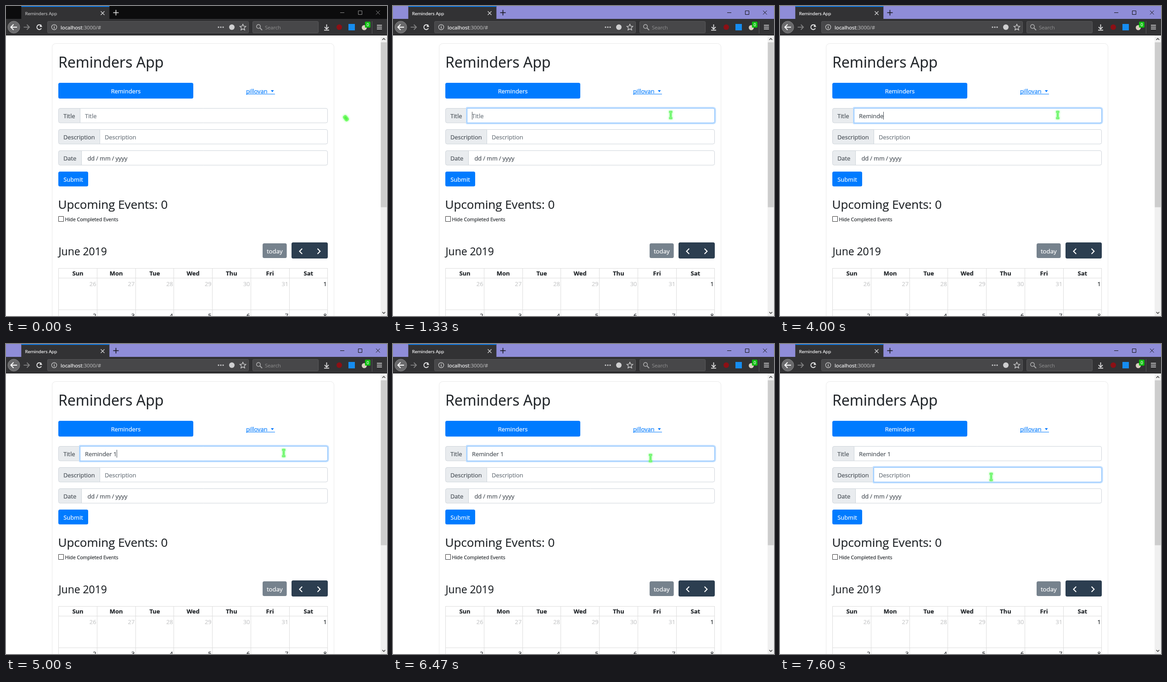
Animation, 830 px wide and 674 px high, one loop 8000 ms. Source, as an HTML page with a canvas:

```html
<!DOCTYPE html>
<html lang="en">
<head>
<meta charset="utf-8">
<title>Reminders App</title>
<style>
html, body { margin: 0; width: 100%; height: 100%; overflow: hidden; background: #fff; }
canvas { display: block; width: 830px; height: 674px; }
</style>
</head>
<body>
<canvas id="stage" width="830" height="674"></canvas>
<script>
const ctx = document.getElementById('stage').getContext('2d');
const LOOP = 8000, TICK = 200 / 3, BLINK = 8;
const FOCUS = 20, CLICK = 105, BODY = 12.85;
const INK = '#212529', BLUE = '#007bff', GRAY = '#495057', HINT = '#6c757d', EDGE = '#ced4da';
const LIGHT = '#e3e3e4', SOFT = '#cfcfd0';

// Typed characters and the ticks they appear at
const TYPED = 'Reminder 1';
const KEYS = [40, 42, 45, 48, 51, 57, 60, 61, 69, 75];

function text(str, x, y, size, color, align = 'left', weight = 'normal') {
  ctx.font = `${weight} ${size}px "Open Sans", sans-serif`;
  ctx.textAlign = align;
  ctx.fillStyle = ctx.strokeStyle = color;
  ctx.lineWidth = 0.22;
  ctx.fillText(str, x, y);
  ctx.strokeText(str, x, y);
  return ctx.measureText(str).width;
}

function rect(x, y, w, h, color) {
  ctx.fillStyle = color;
  ctx.fillRect(x, y, w, h);
}

function paint(fill, stroke, width = 1) {
  if (fill) { ctx.fillStyle = fill; ctx.fill(); }
  if (stroke) { ctx.strokeStyle = stroke; ctx.lineWidth = width; ctx.stroke(); }
}

function box(x, y, w, h, r, fill, stroke) {
  ctx.beginPath();
  ctx.roundRect(x, y, w, h, r);
  paint(fill, stroke);
}

function disc(x, y, r, fill, stroke, width) {
  ctx.beginPath();
  ctx.arc(x, y, r, 0, Math.PI * 2);
  paint(fill, stroke, width);
}

function line(x0, y0, x1, y1, color, width = 1) {
  ctx.beginPath();
  ctx.moveTo(x0, y0);
  ctx.lineTo(x1, y1);
  paint(null, color, width);
}

function cross(x, y, r, color, width) {
  line(x - r, y - r, x + r, y + r, color, width);
  line(x - r, y + r, x + r, y - r, color, width);
}

// Open arrow head with its tip at x, y; turn counts quarter turns from "right"
function chevron(x, y, r, turn, color, width) {
  ctx.save();
  ctx.translate(x, y);
  ctx.rotate(turn * Math.PI / 2);
  ctx.beginPath();
  ctx.moveTo(-r, -r);
  ctx.lineTo(0, 0);
  ctx.lineTo(-r, r);
  paint(null, color, width);
  ctx.restore();
}

function triangle(x, y, w, h, color) {
  ctx.beginPath();
  ctx.moveTo(x, y);
  ctx.lineTo(x + w, y);
  ctx.lineTo(x + w / 2, y + h);
  paint(color);
}

function star(x, y, r) {
  ctx.beginPath();
  for (let i = 0; i < 10; i++) {
    const a = i * Math.PI / 5 - Math.PI / 2, d = i % 2 ? r * 0.48 : r;
    ctx.lineTo(x + d * Math.cos(a), y + d * Math.sin(a));
  }
  ctx.closePath();
  paint(null, SOFT, 1.3);
}

function titleBar(active) {
  const ctl = active ? '#111' : '#929292', plus = active ? '#16161c' : '#e4e4e4';
  rect(0, 0, 830, 28, active ? '#8f8dd8' : '#0c0c0d');
  rect(33.3, 0, 192, 28, '#323234');
  rect(33.3, 0, 192, 1.7, '#0a84ff');
  text('Reminders App', 41.5, 19.5, 9.75, active ? '#f9f9fa' : '#bcbcbd');
  cross(210.5, 15.5, 4, '#d2d2d3', 1.4);
  line(233.5, 14.5, 245.5, 14.5, plus, 1.6);
  line(239.5, 8.5, 239.5, 20.5, plus, 1.6);
  line(728, 14.5, 737, 14.5, ctl);
  box(767.5, 10.5, 8, 8, 0, null, ctl);
  cross(810.3, 14.3, 4.2, ctl);
}

function toolbar() {
  rect(0, 28, 830, 36, '#323234');
  rect(0, 63, 830, 1, '#171718');

  disc(17, 46, 13, '#6a6a6c', '#858586');
  line(10.5, 46, 24, 46, '#fff', 2);
  chevron(10.5, 46, 6, 2, '#fff', 2);
  line(38.5, 46, 51, 46, '#818182', 1.8);
  chevron(51, 46, 5.5, 0, '#818182', 1.8);
  ctx.beginPath();
  ctx.arc(72.5, 46, 5.2, 0.5, 5.5);
  paint(null, LIGHT, 1.9);
  triangle(73, 45.5, 6, -6, LIGHT);

  box(90.5, 33.5, 438, 25, 2, '#474749', '#58585a');
  disc(105, 46, 5.6, null, SOFT, 1.2);
  rect(104.3, 45, 1.5, 4.2, SOFT);
  rect(104.3, 42.6, 1.5, 1.5, SOFT);
  const host = text('localhost', 119, 51, 11.35, '#f9f9fa');
  text(':3000/#', 119 + host, 51, 11.35, '#adadae');
  for (let i = 0; i < 3; i++) disc(463 + i * 5, 46, 1.6, SOFT);
  disc(492, 46, 6, SOFT);
  star(516, 46.5, 7);

  box(537.5, 33.5, 143, 25, 2, '#474749', '#58585a');
  disc(550, 44.5, 4.2, null, '#a9a9aa', 1.7);
  line(553, 47.5, 558, 52.5, '#a9a9aa', 2);
  text('Search', 564, 51, 11.1, '#858586');

  line(698.5, 40, 698.5, 50, LIGHT, 1.8);
  chevron(698.5, 50.2, 4.5, 1, LIGHT, 1.8);
  line(693, 52.5, 704, 52.5, LIGHT, 1.8);
  disc(726, 46, 6, '#8c1015');
  rect(746, 39, 14, 14, '#168df0');
  disc(780.5, 47, 5.5, '#d8cfbf');
  box(782, 34, 12, 13, 1.5, '#10bd10');
  text('0', 788, 44, 9, '#fff', 'center');
  rect(797, 33, 1, 27, '#59595b');
  for (let i = 0; i < 3; i++) rect(808, 41 + i * 4, 11, 1.6, LIGHT);
}

function scrollbar() {
  rect(816, 64, 14, 610, '#f0f0f0');
  rect(816.5, 79, 12.8, 358.5, '#cdcdcd');
  chevron(823, 70.4, 3.2, 3, '#505050', 1.7);
  chevron(823, 668.6, 3.2, 1, '#505050', 1.7);
}

// One labelled form row; split is where the input starts
function field(label, y, split, focused) {
  box(114.5, y + 0.5, split - 114, 31.5, [3.5, 0, 0, 3.5], '#e9ecef', EDGE);
  if (focused) box(split - 2, y - 2.6, 705.6 - split, 37.5, [2, 6, 6, 2], '#bfdeff');
  box(split + 0.5, y + 0.5, 700 - split, 31.5, [0, 3.5, 3.5, 0], '#fff', focused ? '#80bdff' : EDGE);
  text(label, 125, y + 22, BODY, GRAY);
}

function caretShown(n) {
  // Each key shows the caret; the blink timer keeps its own beat
  const base = n >= CLICK ? CLICK : FOCUS;
  const beat = k => Math.floor((k - base) / BLINK);
  const last = Math.max(...[base, ...KEYS].filter(k => k <= n));
  return (beat(n) - beat(Math.max(base, last))) % 2 === 0;
}

function form(n) {
  const typed = TYPED.slice(0, KEYS.filter(k => k <= n).length);
  const inTitle = n >= FOCUS && n < CLICK, inNote = n >= CLICK;

  field('Title', 222, 161, inTitle);
  const width = text(typed || 'Title', 172, 244, BODY, typed ? GRAY : HINT);
  field('Description', 268, 204, inNote);
  text('Description', 215, 290, BODY, HINT);
  field('Date', 314, 164, false);
  let x = 177.5;
  for (const part of ['dd', '/', 'mm', '/', 'yyyy']) x += text(part, x, 336, BODY, GRAY) + 3;

  if (n >= FOCUS && caretShown(n)) {
    if (inNote) rect(215, 276, 1, 17, GRAY);
    else rect(Math.round(172 + (typed ? width : 0)), 230, 1, 17, GRAY);
  }
}

function calendar() {
  text('June 2019', 114.5, 542, 22.9, INK);
  box(559, 516, 52.6, 32, 3.5, '#76828d');
  text('today', 585.3, 538, 13.2, '#fff', 'center');
  box(622, 514, 79, 35, 3.5, '#2c3e50');
  chevron(639.5, 533.3, 5.7, 2, '#fff', 2.1);
  chevron(684.3, 533.3, 5.7, 0, '#fff', 2.1);

  const step = 83.72, grid = '#ddd';
  for (const y of [570, 591, 660]) rect(114, y, 587, 1, grid);
  for (let i = 0; i < 8; i++) rect(Math.round(114.3 + i * step), 570, 1, 104, grid);
  ['Sun', 'Mon', 'Tue', 'Wed', 'Thu', 'Fri', 'Sat'].forEach((day, i) => {
    const right = 196.5 + i * step, date = 26 + i, june = date > 31;
    text(day, 156.5 + i * step, 586, 13, INK, 'center', 'bold');
    text(june ? date - 31 : date, right, 609, BODY, june ? INK : '#c8c9ca', 'right');
    text(i + 2, right, 678, BODY, INK, 'right');
  });
}

function page(n) {
  rect(0, 64, 830, 610, '#fff');
  box(100.5, 81.5, 614, 640, 8, '#fff', '#e9e9e9');
  text('Reminders App', 114, 134, 32.1, INK);

  box(114, 167, 294, 34.2, 3.5, BLUE);
  text('Reminders', 261, 190, BODY, '#fff', 'center');
  text('pillovan', 523, 190, BODY, BLUE);
  rect(523, 191, 63, 1, BLUE);
  triangle(577, 183, 6.5, 4.5, BLUE);

  form(n);

  box(114, 360, 65, 32.3, 3.5, BLUE);
  text('Submit', 125.3, 382, BODY, '#fff');
  text('Upcoming Events: 0', 113.5, 441, 26, INK);
  box(114.5, 457.5, 11, 11, 0, '#fff', '#3a3a3a');
  text('Hide Completed Events', 128.5, 468, 10.7, INK);
  calendar();
  scrollbar();
}

// Eased progress of a move between two ticks
function glide(n, from, to) {
  const k = Math.min(1, Math.max(0, (n - from) / (to - from)));
  return Math.sin(k * Math.PI / 2) ** 1.25;
}

function pointer(n) {
  const enter = glide(n, 12, 17), leave = glide(n, 94, 106);
  const x = Math.round(735 - 130 * enter - 145 * leave);
  const y = Math.round(238 - enter + 52 * leave ** 1.3);
  const overField = x < 701 && (y < 255 || y > 267);

  ctx.save();
  ctx.shadowColor = '#7dff7d';
  ctx.shadowBlur = 4;
  if (overField) {
    for (const [color, width] of [['#5cf65c', 4], ['#a8f5a0', 1]]) {
      line(x, y - 7, x, y + 7, color, width);
      for (const end of [-7, 7]) line(x - 3.5, y + end, x + 3.5, y + end, color, width);
      ctx.shadowBlur = 0;
    }
  } else {
    ctx.translate(x + 5.5, y + 6);
    ctx.rotate(0.9);
    box(-7, -4.5, 14, 9, 4, '#74ff66');
    ctx.shadowBlur = 0;
    box(-4, -2.5, 8, 5, 2, '#58f04c');
  }
  ctx.restore();
}

function draw(now) {
  const n = Math.floor((now % LOOP + 4) / TICK);
  titleBar(n >= FOCUS);
  toolbar();
  page(n);
  pointer(n);
}

let start;
function frame(now) {
  start ??= now;
  draw(now - start);
  requestAnimationFrame(frame);
}
draw(0);
requestAnimationFrame(frame);
</script>
</body>
</html>
```
